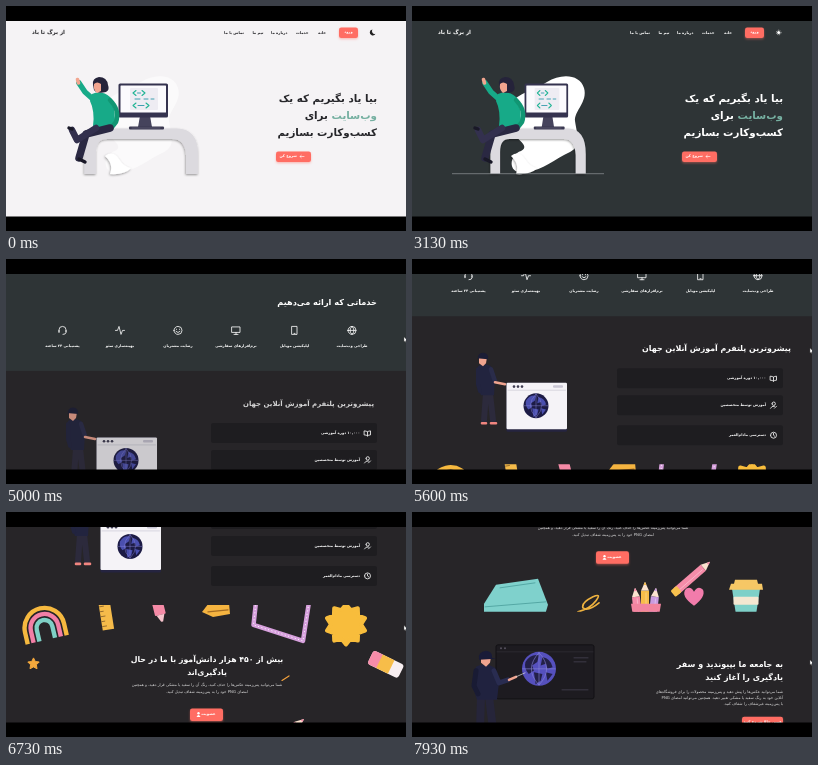
Write an HTML page that moves like this. It is 400 px wide and 225 px high and loops after 8 s.

```html
<!DOCTYPE html>
<html lang="fa">
<head>
<meta charset="utf-8">
<style>
html, body { margin: 0; width: 100%; height: 100%; overflow: hidden; background: #000; }
svg { display: block; width: 100vw; height: 100vh; }
text { direction: rtl; font-family: "DejaVu Sans", sans-serif; }
.b { font-weight: bold; }
.line { fill: none; stroke: #fff; stroke-width: .8; stroke-linecap: round; stroke-linejoin: round; }
</style>
</head>
<body>
<svg id="stage" viewBox="0 0 400 225" xmlns="http://www.w3.org/2000/svg"></svg>
<script>
const LOOP = 8000;
const stage = document.getElementById('stage');

// y is the vertical middle of the line; "_" stands for a zero-width non-joiner
const text = (x, y, size, str, attr = '') =>
  `<text x="${x}" y="${y + size * .27}" font-size="${size}" ${attr}>${str.replace(/_/g, '&zwnj;')}</text>`;
const bold = (x, y, size, str, attr = '') => text(x, y, size, str, 'class="b" ' + attr);
const mid = 'text-anchor="middle"';
const rect = (x, y, w, h, fill, r = 0, attr = '') =>
  `<rect x="${x}" y="${y}" width="${w}" height="${h}" rx="${r}" fill="${fill}" ${attr}/>`;
const path = (d, fill, attr = '') => `<path d="${d}" fill="${fill}" ${attr}/>`;
const stroke = (d, color, w) =>
  path(d, 'none', `stroke="${color}" stroke-width="${w}" stroke-linecap="round" stroke-linejoin="round"`);
const dot = (x, y, r, fill) => `<circle cx="${x}" cy="${y}" r="${r}" fill="${fill}"/>`;
const group = (attr, ...parts) => `<g ${attr}>${parts.join('')}</g>`;
const button = (x, y, w, h) => rect(x, y, w, h, '#ff6d63', 2.2, 'filter="url(#glow)"');

// Star or flower outline: n points between two radii
function burst(x, y, n, inner, outer) {
  const pts = [];
  for (let i = 0; i < n * 2; i++) {
    const r = i % 2 ? inner : outer, a = i * Math.PI / n - Math.PI / 2;
    pts.push((x + r * Math.cos(a)).toFixed(1) + ' ' + (y + r * Math.sin(a)).toFixed(1));
  }
  return 'M' + pts.join('L') + 'Z';
}

function globe(x, y, r, sea, land) {
  return group(`transform="translate(${x} ${y}) scale(${r / 10})"`,
    dot(0, 0, 10, sea),
    path('M-8-4Q-5-9 0-8L-1-4L-4-2L-3 1L-6 3Q-9 0-8-4ZM2-7Q7-6 8-1L5 0L4-3L1-2ZM-3 2L2 3L1 7L-2 9ZM4 2L8 3L5 7Z', land),
    stroke('M-9.5 0H9.5M0-9.5V9.5M0-9.5Q-9 0 0 9.5Q9 0 0-9.5', '#8a86d8', .35));
}

const woman = group('',
  stroke('M88 94L79 86L73 77', '#17aa88', 5.5),
  stroke('M72.5 77L71.5 73.5', '#f2a58f', 3.6),
  path('M86 88Q96 84 104 91Q111 106 108 121Q97 125 87 120Q89 105 84 95Z', '#17aa88'),
  path('M87 79Q86 72 93 71Q101 71 102 79Q104 84 100 86Q91 88 88 84Z', '#25233a'),
  path('M88 78Q91 75 95 78L95 85L91 87Q87 84 88 78Z', '#f2a58f'),
  stroke('M104 94Q114 104 110 116L106 121', '#119673', 4.5),
  stroke('M104 122L80 128L73 152', '#2a2842', 7.5),
  stroke('M90 122L71 134L66 124', '#33304e', 6.5),
  stroke('M66 123L63 122M73 153L79 156', '#191827', 3.4));

const monitor = group('id="monitor"',
  path('M134 110H144L146 121H132Z', '#45435c'),
  rect(112.5, 77.5, 49.5, 34, '#35334f', 1.6),
  rect(114.5, 79.5, 45.5, 27, '#fbfafd', .5),
  rect(124, 82, 28, 22, '#eeecf3', 1),
  stroke('M130 84.5L127 87L130 89.5M136 84.5L139 87L136 89.5M130 97L127 99.5L130 102M140 97L143 99.5L140 102', '#20b494', 1.1),
  stroke('M131.5 87H134.5M129 93H134M138 93H142M145 93H148M132 99.5H138', '#3f9fb0', 1),
  rect(123, 120.5, 35, 3, '#3a3850', 1),
  stroke('M126 122H154', '#77758c', .5));

const hero = group('id="hero"',
  path('M101 94C113 85 125 82 135 76C149 67 168 68 172 82C176 96 162 105 163 115C165 129 170 140 158 146C143 153 130 164 116 166C95 171 96 149 109 145C122 139 94 128 91 114C89 104 95 98 101 94Z', '#fff', 'id="blob"'),
  path('M99 150Q107 144 113 153Q118 161 125 162Q119 169 104 168Q108 158 99 150Z', '#fff', 'filter="url(#soft)"'),
  path('M78.5 168V137Q78 122.5 92 122.5H171Q192 123 192 148V168H180V149Q179 133 166 133H101Q90 133 90 146V168Z', '#dcdadf', 'id="desk" filter="url(#soft)"'),
  monitor, woman,
  '<path id="ground" d="M40 167.7H192" stroke="#85898c" stroke-width=".8"/>',
  group('id="ink"',
    bold(59, 26.5, 5.5, 'از برگ تا باد'),
    bold(320, 26.5, 3.8, 'خانه'), bold(302.5, 26.5, 3.8, 'خدمات'),
    bold(281.5, 26.5, 3.8, 'درباره ما'), bold(257.5, 26.5, 3.8, 'تیم ما'),
    bold(238, 26.5, 3.8, 'تماس با ما'),
    bold(371, 93, 10.3, 'بیا یاد بگیریم که یک'),
    bold(371, 110, 10.3, '<tspan fill="#76b0a1">وب_سایت</tspan> برای'),
    bold(371, 127, 10.3, 'کسب_وکارت بسازیم')),
  button(333, 21.5, 19, 10.5), bold(342.5, 26.5, 3.6, 'ورود', mid + ' fill="#fff"'),
  button(270, 145.5, 35, 10.5), bold(291, 150.5, 3.7, 'شروع کن', 'fill="#fff"'),
  stroke('M298 150.5H294M295.3 149.3L294 150.5L295.3 151.7', '#fff', .6),
  path('M366.5 23.5A3 3 0 1 0 369.5 27.7A2.7 2.7 0 0 1 366.5 23.5Z', '#222', 'id="moon"'),
  group('id="sun"', dot(366.7, 26.5, 1.5, '#fff'),
    '<circle cx="366.7" cy="26.5" r="2.3" fill="none" stroke="#ddd" stroke-width=".8" stroke-dasharray=".9 .9"/>'));

const labels = [[346, 'طراحی وب_سایت'], [288.5, 'اپلیکیشن موبایل'], [230, 'نرم_افزارهای سفارشی'],
  [172, 'رضایت مشتریان'], [114, 'بهینه_سازی سئو'], [56.5, 'پشتیبانی ۲۴ ساعته']];
const icons = [
  'M-4 0A4 4 0 1 0 4 0A4 4 0 1 0-4 0ZM-4 0H4M0-4Q-4 0 0 4Q4 0 0-4',
  'M-2.5-4H2.5V4H-2.5ZM-.5 3H.5',
  'M-4-3.5H4V2H-4ZM0 2V4M-2 4H2',
  'M-4 0A4 4 0 1 0 4 0A4 4 0 1 0-4 0ZM-1.5-1.2V-1M1.5-1.2V-1M-2 1Q0 3.5 2 1',
  'M-4.5 0H-2.5L-1-4L1 4L2.5 0H4.5',
  'M-3.5 1.5V-.5A3.5 3.5 0 0 1 3.5-.5V1.5M-3.5 0V2M3.5 0V2Q3.5 4 .5 4'];
const services = group('transform="translate(0 190)"',
  bold(371, 44, 8.2, 'خدماتی که ارائه می_دهیم', 'fill="#fff"'),
  ...labels.map(([x, str], i) =>
    `<path class="line" transform="translate(${x} 71.5)" d="${icons[i]}"/>` +
    bold(x, 87, 3.7, str, mid + ' fill="#fff"')));

const man = group('',
  stroke('M74 86L72 113M78 86L81 113', '#2c2a3c', 6),
  stroke('M70 116H74M79 116H84', '#f0857f', 2.6),
  path('M66 59Q72 55 79 59L83 71L82 88H69L64 76Z', '#22243f'),
  stroke('M66 62L66 77L68 84', '#22243f', 4),
  stroke('M79 62L83 74', '#2a2c4a', 4.5),
  stroke('M83 75L93 77', '#f0a48f', 2.5),
  path('M67 50H75L74 56L71 59L67 56Z', '#f0a48f'),
  path('M66 52Q65 46 71 45.5Q77 46 76 52L65 51Z', '#1b1d35'));

const cards = [[61, '۱۰,۰۰۰ دوره آموزشی', 'M-3-2Q-1-2 0-1Q1-2 3-2V2Q1 2 0 3Q-1 2-3 2ZM0-1V3'],
  [88, 'آموزش توسط متخصصین', 'M-1.5-1.5A1.7 1.7 0 1 0 1.9-1.5A1.7 1.7 0 1 0-1.5-1.5M-3 3Q-2 .5 1 1M1 3L3 1'],
  [118, 'دسترسی مادام_العمر', 'M-3 0A3 3 0 1 0 3 0A3 3 0 1 0-3 0M0-1.8V0L1.2 1']];
const platform = group('transform="translate(0 293)"',
  group('id="lead"', bold(0, 0, 7.9, 'پیشروترین پلتفرم آموزش آنلاین جهان', mid + ' fill="#fff"')),
  group('id="worker"',
    man,
    rect(94.5, 75.5, 60.5, 49, '#252440', 1.5),
    rect(94.5, 75.5, 60.5, 46.5, '#f5f3f7', 1.2),
    stroke('M96 83H153.5', '#b9b6c6', .5),
    ...[102, 106, 110].map(x => dot(x, 79.4, 1.3, '#3d3b50')),
    rect(141, 78, 10, 2.5, '#c9c6d4', 1),
    globe(124, 98.5, 12.5, '#1c1b45', '#4a4fae')),
  ...cards.map(([y, str, d]) => rect(205, y, 166, 20, '#1e1d20', 2) +
    bold(354, y + 10, 3.7, str, 'fill="#fff"') +
    `<path class="line" transform="translate(361.5 ${y + 10})" d="${d}"/>`));

const crayon = (x, y, angle, color, len) => group(`transform="translate(${x} ${y}) rotate(${angle})"`,
  path('M0 0L4 9H-4Z', '#fbe3cf'), path('M0 0L1.4 3.2H-1.4Z', color),
  rect(-4, 9, 8, len, color), stroke(`M1 11V${len + 7}`, '#ffffff66', .8));

const doodles = group('transform="translate(0 421)"',
  group('clip-path="url(#band)"',
    group('transform="rotate(-13 39 54)"',
      ...[['#f6b93f', 20], ['#f27fa6', 14], ['#7fd0c6', 8]].map(([c, r]) =>
        path(`M${39 - r} 64V52A${r} ${r} 0 0 1 ${39 + r} 52V64`, 'none', `stroke="${c}" stroke-width="4.4"`))),
    group('transform="rotate(-9 100 40)"', rect(94.5, 22, 11.5, 32, '#f5bb4a'),
      stroke('M95 30H99M95 35H98M95 40H99M95 45H98M95 50H99', '#775224', .7)),
    group('transform="rotate(-14 154 37)"', rect(148.5, 25, 11, 14, '#f58aa6', 1),
      path('M150 39H158L155 46H153Z', '#f7c4cd')),
    path('M196 36L203 27H223L224 38L207 41Z', '#f5b440'), stroke('M202 36L222 34', '#a46c22', 1.2),
    path('M250 26L247.5 49L297 65L303 26', 'none', 'stroke="#d7a0dd" stroke-width="4.5" stroke-linejoin="round"'),
    path('M250 26L247.5 49L297 65L303 26', 'none', 'stroke="#fff" stroke-dasharray="1 2.5"'),
    path(burst(340, 48.5, 10, 15, 20), '#f8bd3c', 'stroke="#f8bd3c" stroke-width="4" stroke-linejoin="round"'),
    path(burst(27.5, 88, 5, 3, 6), '#f4a83c', 'stroke="#f4a83c" stroke-linejoin="round"'),
    stroke('M276 104.5L283 100', '#f3a13c', 1.2),
    crayon(298, 143, 49, '#f58ca9', 36),
    group('transform="translate(298 143) rotate(49)"', rect(-4, 41, 8, 8, '#f7c14e', 1.5)),
    group('transform="rotate(26 380 88)"', rect(363, 81, 34, 15, '#f7eef1', 3),
      rect(363, 81, 12, 15, '#f58ca9', 3), rect(373, 81, 13, 15, '#f7bd49')),
    path('M72 185L84 166L126 160L136 186L133 196H72Z', '#7fd1cc'),
    stroke('M73 188L134 183M88 169L123 164', '#4a9d9b', .8),
    stroke('M166 193Q178 190 184 182Q190 174 181 178Q169 184 171 189Q176 193 187 184', '#eeb23f', 1.7),
    crayon(223, 169, -6, '#f58ca9', 28), crayon(233, 163, 0, '#f7bd49', 32), crayon(244, 169, 7, '#c99be0', 28),
    path('M219 185H249L247 197H221Z', '#f2849f'),
    path('M282 187Q268 177 274 170Q279 167 282 173Q286 166 291 171Q294 178 282 187Z', '#f27cab'),
    path('M320 170H348L344 196H324Z', '#7ed0c8'), rect(321.5, 178, 25, 8, '#f4e7d1', 1),
    path('M317 171L319 165H322L323 161H345L346 165H350L351 171Z', '#f6c765')),
  bold(201, 84, 7.8, 'بیش از ۴۵۰ هزار دانش_آموز با ما در حال', mid + ' fill="#fff"'),
  bold(201, 97, 7.8, 'یادگیری_اند', mid + ' fill="#fff"'),
  text(201, 109.5, 3.9, 'شما می_توانید پس_زمینه عکس_ها را حذف کنید، رنگ آن را سفید یا مشکی قرار دهید، و همچنین', mid + ' fill="#ddd"'),
  text(201, 116.5, 3.9, 'امضای PNG خود را به پس_زمینه شفاف تبدیل کنید.', mid + ' fill="#ddd"'),
  button(184, 132.5, 33, 12.5), bold(209.5, 138.5, 3.8, 'عضویت', 'fill="#fff"'),
  dot(192.5, 137.3, 1.2, '#fff'), path('M190.5 141Q192.5 137 194.5 141Z', '#fff'));

const join = group('transform="translate(0 514)"',
  group('id="guide"',
    rect(84, 133, 98, 54, '#1d1b20', 2, 'stroke="#121114"'),
    stroke('M85 140H181', '#3a3740', .5), stroke('M162 146H176M162 150H174M150 178H176', '#3d3a47', 1),
    dot(89, 136.5, 1, '#55515e'), dot(93, 136.5, 1, '#55515e'),
    globe(127, 157, 17, '#5550bd', '#232048'),
    stroke('M69 184L68 218M77 184L81 218', '#26253a', 8),
    path('M64 155Q73 150 83 156L87 171L85 188H65L60 172Z', '#20223f'),
    stroke('M82 159L87 171L96 168', '#292c50', 5), stroke('M97 168L104 165', '#f0a48f', 2.6),
    stroke('M104 165L113 161', '#ddd', .7),
    stroke('M64 159L62 174L66 182', '#191b34', 5),
    path('M69 145H79L78 151L74 155L69 151Z', '#f0a48f'),
    path('M67 147Q66 140 74 139Q81 140 80 146L84 147L67 148Z', '#191b38')),
  bold(371, 153.5, 8, 'به جامعه ما بپیوندید و سفر', 'fill="#fff"'),
  bold(371, 166, 8, 'یادگیری را آغاز کنید', 'fill="#fff"'),
  text(371, 180, 3.9, 'شما می_توانید عکس_ها را پیش دهید و پس_زمینه محصولات را برای فروشگاه_های', 'fill="#ddd"'),
  text(371, 186, 3.9, 'آنلاین خود به رنگ سفید یا مشکی تغییر دهید. همچنین می_توانید امضای PNG', 'fill="#ddd"'),
  text(371, 192, 3.9, 'با پس_زمینه غیرشفاف را شفاف کنید.', 'fill="#ddd"'),
  button(330, 205, 41, 12.5), bold(350.5, 210.5, 3.7, 'همین حالا شروع کنید', mid + ' fill="#fff"'));

stage.innerHTML = `<defs>
  <filter id="glow" x="-20%" y="-30%" width="140%" height="190%"><feDropShadow dx="0" dy="1.2" stdDeviation="1.2" flood-color="#ff6d63" flood-opacity=".45"/></filter>
  <filter id="soft" x="-20%" y="-20%" width="140%" height="140%"><feDropShadow dx="-.5" dy="1" stdDeviation="1.3" flood-opacity=".4"/></filter>
  <clipPath id="band"><rect y="29" width="400" height="164"/></clipPath>
</defs>` +
  rect(0, 0, 400, 225, '#f5f3f5', 0, 'id="back"') +
  group('id="page"', rect(0, 302, 400, 600, '#272528'), hero, services, platform, doodles, join) +
  path('M0 0V4.8L1.2 3.8L2 5.6L2.9 5.2L2.1 3.5H3.6Z', '#fff', 'id="cursor" stroke="#555" stroke-width=".4"') +
  rect(0, 0, 400, 15, '#000') + rect(0, 210.5, 400, 15, '#000');

const el = {};
stage.querySelectorAll('[id]').forEach(n => el[n.id] = n);
const set = (id, name, value) => el[id].setAttribute(name, value);

const scrollKeys = [[3530, 0], [5000, 190], [6130, 293], [7330, 421], [7930, 514], [8000, 525]];
const cursorX = [[930, 403], [1730, 372], [2650, 372], [3000, 405], [4330, 405], [4600, 398]];
const cursorY = [[930, 90], [1730, 27], [2650, 27], [3000, 38], [3530, 38], [5000, 78], [6130, 99], [7330, 128], [7930, 148], [8000, 150]];

function at(keys, t) {
  let [t0, v0] = keys[0];
  for (const [t1, v1] of keys) {
    if (t < t1) return t < t0 ? v0 : v0 + (v1 - v0) * (t - t0) / (t1 - t0);
    [t0, v0] = [t1, v1];
  }
  return v0;
}
const ramp = (t, a, b) => Math.min(1, Math.max(0, (t - a) / (b - a)));
const smooth = p => p * p * (3 - 2 * p);
const mix = (a, b, k) => `rgb(${a.map((v, i) => Math.round(v + (b[i] - v) * k))})`;

function draw(t) {
  const dark = smooth(ramp(t, 2100, 2700));
  set('back', 'fill', mix([245, 243, 245], [46, 52, 54], dark));
  set('ink', 'fill', mix([38, 38, 42], [255, 255, 255], dark));
  set('blob', 'opacity', .6 + .4 * dark);
  set('ground', 'opacity', dark);
  set('moon', 'opacity', 1 - dark);
  set('sun', 'opacity', dark);
  set('desk', 'transform', `translate(78 0) scale(${1 - .16 * dark} 1) translate(-78 0)`);
  set('monitor', 'transform', `translate(113 0) scale(${1 - .12 * dark} 1) translate(-113 0)`);
  set('page', 'transform', `translate(0 ${-at(scrollKeys, t)})`);

  const shown = ramp(t, 4640, 5240);
  set('lead', 'transform', `translate(${304.5 - 5 * (1 - shown)} 42) scale(${.7 + .3 * shown})`);
  set('lead', 'opacity', .5 + .5 * shown);
  set('worker', 'transform', `translate(${-10 * (1 - shown)} 0)`);
  set('worker', 'opacity', .5 + .5 * shown);
  const joined = smooth(ramp(t, 7350, 7850));
  set('guide', 'transform', `translate(${-10 * (1 - joined)} 0)`);
  set('guide', 'opacity', joined);

  set('cursor', 'transform', `translate(${at(cursorX, t)} ${at(cursorY, t)})`);
}

function tick(now) {
  draw(now % LOOP);
  requestAnimationFrame(tick);
}
draw(0);
requestAnimationFrame(tick);
</script>
</body>
</html>
```
